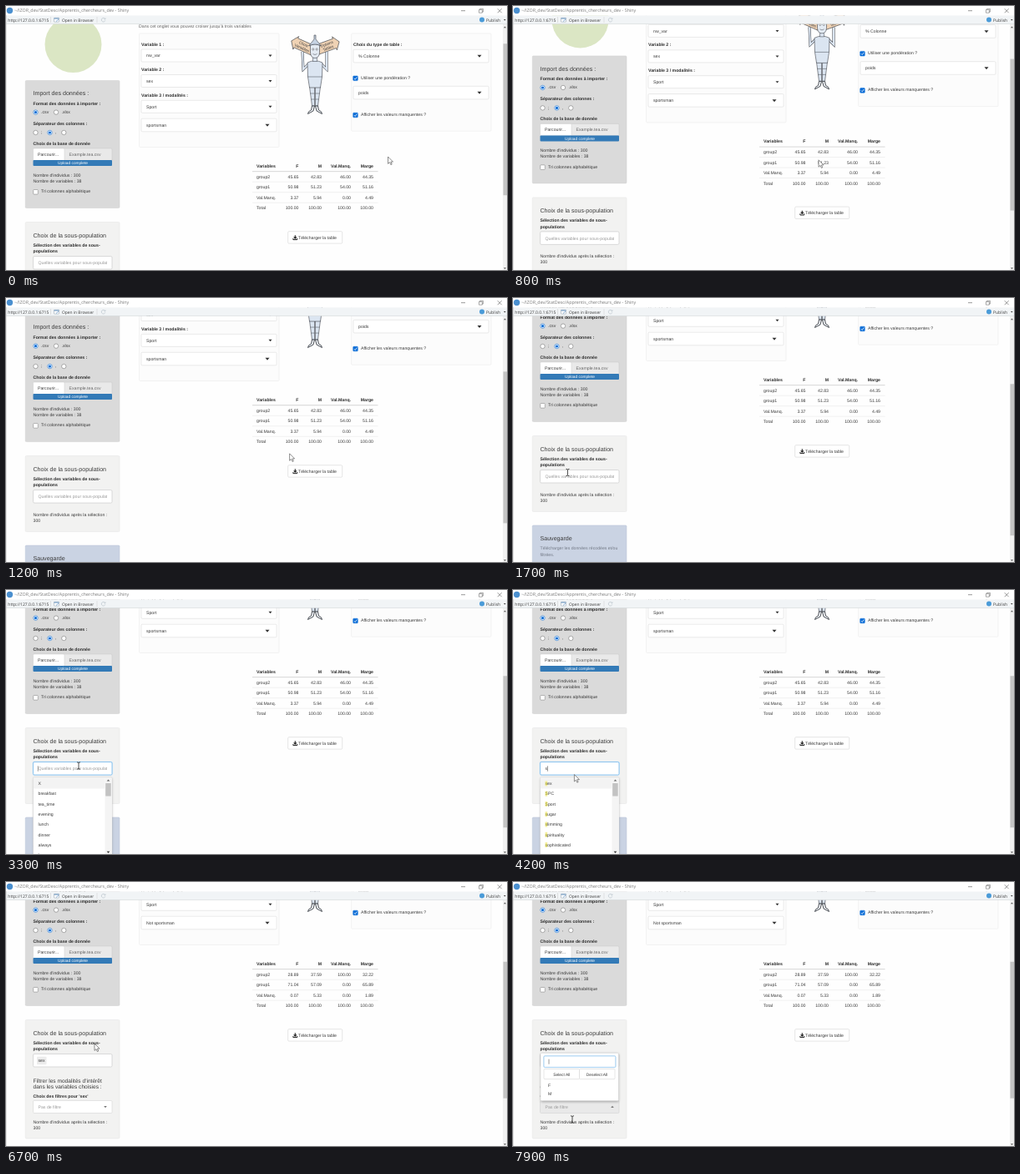
These frames come from a looping animation (600x317 px, 8 s). An HTML page:

```html
<!DOCTYPE html>
<html lang="fr">
<head>
<meta charset="utf-8">
<title>Animation</title>
<style>
html, body { margin: 0; width: 100%; height: 100%; overflow: hidden; background: #fff; }
svg { display: block; width: 600px; height: 317px; }
text { font-family: "Liberation Sans", Arial, sans-serif; font-size: 5.2px; fill: #3a3a3a; white-space: pre; text-rendering: geometricPrecision; }
.b { font-weight: bold; fill: #2c2c2c; }
.h { font-size: 7.1px; }
.h5 { font-size: 6.6px; }
.dim { fill: #999; }
.ui { font-family: "Open Sans", sans-serif; font-size: 5.35px; }
.end { text-anchor: end; }
.mid { text-anchor: middle; }
</style>
</head>
<body>
<svg id="stage" viewBox="0 0 600 317" xmlns="http://www.w3.org/2000/svg"></svg>
<script>
const LOOP = 8000, OPEN = 2200, TYPE = 3900, PICK = 4700, UPDATE = 4900, CLOSE = 6100, FILTER = 7450;
const BLUE = '#337ab7';

// y is the vertical middle of lowercase letters
const text = (x, y, s, cls = '', extra = '') =>
  `<text x="${x}" y="${y + 1.8}" class="${cls}" ${extra}>${s}</text>`;
const rect = (x, y, w, h, fill, stroke = 'none', r = 0, extra = '') =>
  `<rect x="${x}" y="${y}" width="${w}" height="${h}" rx="${r}" fill="${fill}" stroke="${stroke}" stroke-width=".5" ${extra}/>`;
const path = (d, fill = 'none', stroke = '#333', w = .6, extra = '') =>
  `<path d="${d}" fill="${fill}" stroke="${stroke}" stroke-width="${w}" ${extra}/>`;
const caretDown = (x, y, s = 2, c = '#333') => path(`M${x - s} ${y - s / 2}h${2 * s}l${-s} ${s * 1.2}z`, c, 'none');
const caretUp = (x, y, s = 2, c = '#333') => path(`M${x - s} ${y + s / 2}h${2 * s}l${-s} ${-s * 1.2}z`, c, 'none');
const group = (id, body, extra = '') => `<g id="${id}" ${extra}>${body}</g>`;

const select = (x, y, w, h, label, ax = x + w - 7.5, s = 2) =>
  rect(x, y, w, h, '#fff', '#d5d5d5', 1.2) + text(x + 6, y + h / 2, label) + caretDown(ax, y + h / 2, s);
const radio = (x, y, on) =>
  `<circle cx="${x}" cy="${y}" r="2.7" fill="#fff" stroke="${on ? '#0a6cd6' : '#777'}" stroke-width=".6"/>` +
  (on ? `<circle cx="${x}" cy="${y}" r="1.6" fill="#0a6cd6"/>` : '');
const check = (x, y, on) =>
  rect(x, y, 5.6, 5.6, on ? '#0a6cd6' : '#fff', on ? '#0a6cd6' : '#777', .8) +
  (on ? path(`M${x + 1.2} ${y + 2.9}l1.3 1.3 2.1-2.8`, 'none', '#fff', .8) : '');

function robot() {
  const metal = '#dbe5f1', ink = '#3d4148';
  const limb = (d, w) => path(d, 'none', ink, w + 1) + path(d, 'none', metal, w);
  const sign = (cx, a, dir, l1, l2) =>
    `<g transform="translate(${cx} 48) rotate(${a})">` +
    path(`M${-13 * dir} -6H${9 * dir}V-8.5L${15 * dir} 0L${9 * dir} 8.5V6H${-13 * dir}z`, '#efd2b4', ink) +
    text(0, -2.6, l1, 'mid', 'style="font-size:4.6px"') + text(0, 2.4, l2, 'mid', 'style="font-size:4.6px"') + '</g>';
  return limb('M362 70L356 76 355 55', 2) + limb('M378 70L384 76 384 55', 2) +
    sign(355.5, 24, -1, 'Choix', 'Variables') + sign(385, -20, 1, 'Options', 'Tables') +
    path('M363.5 97H369.5L369.5 120H366.5z M370.5 97H376.5L373.5 120H370.500z', metal, ink) +
    path('M364.5 105h5M365.5 112h4M370.5 105h5M370.5 112h4', 'none', ink, .5) +
    path('M366.5 120h3L368 126 361.500 129.500Q361.500 126.500 365.5 125zM370.5 120h3L374.500 125Q378.500 126.500 378.500 129.500L372 126z', '#eef1f5', ink, .9) +
    path('M361 68Q370 63.500 379 68L378.500 85 376.500 98H363.5L361.5 85z', metal, ink) +
    path('M361.5 85h17', 'none', ink, .5) +
    path('M367.5 60h5v6.500h-5z', metal, ink, .5) +
    path('M364.5 47Q370 44.500 375.5 47V56Q375 62.500 370 62.500T364.5 56z', '#e4ebf3', ink) +
    path('M362.5 48Q370 44 377.5 48L371 40V35H369V40z', '#c6d3e3', ink) +
    `<circle cx="367.8" cy="52" r="1.1" fill="#fff" stroke="${ink}" stroke-width=".5"/>` +
    `<circle cx="372.2" cy="52" r="1.1" fill="#fff" stroke="${ink}" stroke-width=".5"/>` +
    path('M367.5 57.5Q370 59.5 372.5 57.5', 'none', ink, .5);
}

const TABLES = [
  ['45.65 42.83 46.00 44.35', '50.98 51.23 54.00 51.16', '3.37 5.94 0.00 4.49', '100.00 100.00 100.00 100.00'],
  ['28.89 37.59 100.00 32.22', '71.04 57.09 0.00 65.89', '0.07 5.33 0.00 1.89', '100.00 100.00 100.00 100.00']
];
const COLS = [350.5, 378, 413, 440];
const figures = rows => rows.map((r, i) =>
  r.split(' ').map((v, j) => text(COLS[j], 205 + 12.5 * i, v, 'end')).join('')).join('');

function mainArea() {
  let s = text(159, 24.5, "Dans cet onglet vous pouvez croiser jusqu'à trois variables", '', 'fill-opacity=".8"');
  s += rect(159.5, 33, 167.5, 136.5, '#fcfcfc', '#e6e6e6', 1);
  s += rect(413.7, 33, 167.3, 117.2, '#fcfcfc', '#e6e6e6', 1);
  s += text(162, 46, 'Variable 1 :', 'b') + select(162, 52, 162, 15, 'nw_var');
  s += text(162, 76.3, 'Variable 2 :', 'b') + select(162, 82.5, 162, 15, 'sex');
  s += text(162, 107.3, 'Variable 3 / modalités :', 'b') + select(162, 113.3, 162, 15, 'Sport');
  s += select(162, 135.2, 162, 15.6, '', 313, 2.5);
  s += group('mod0', text(168, 143, 'sportsman')) + group('mod1', text(168, 143, 'Not sportsman'));
  s += text(416, 46, 'Choix du type de table :', 'b') + select(416, 52.3, 162, 15.6, '% Colonne', 567, 2.5);
  s += check(415.7, 84, true) + text(425, 85.8, 'Utiliser une pondération ?');
  s += select(416, 96.3, 162, 15.6, 'poids', 567, 2.5);
  s += check(415.7, 128.2, true) + text(425, 129.7, 'Afficher les valeurs manquentes ?');
  s += robot();
  s += text(300, 192, 'Variables', 'b');
  ['F', 'M', 'Val.Manq.', 'Marge'].forEach((c, j) => s += text(COLS[j], 192, c, 'b end'));
  s += path('M295 198.7H445.5', 'none', '#ccc', .8);
  ['group2', 'group1', 'Val.Manq.', 'Total'].forEach((n, i) => {
    s += text(300, 205 + 12.5 * i, n);
    if (i) s += path(`M295 ${198.7 + 12.5 * i}H445.5`, 'none', '#e0e0e0', .5);
  });
  s += group('tab0', figures(TABLES[0])) + group('tab1', figures(TABLES[1]));
  s += rect(337.7, 270.7, 65, 14.4, '#fff', '#ccc', 1.2) + text(350, 278, 'Télécharger la table');
  s += path('M346.3 275.3v3.5M344.7 277.3l1.6 1.8 1.6-1.8', 'none', '#222', 1.1) +
    path('M343.9 279v1.6h4.8v-1.6', 'none', '#222', 1);
  return s;
}

const count = y => text(32.5, y, "Nombre d'individus après la sélection :") + text(32.5, y + 7, '300');

function sidebar() {
  let s = '<circle cx="80.5" cy="46" r="34" fill="#dbe6c4"/>';
  s += rect(23.2, 89.5, 112.8, 153, '#dadada', '#cfcfcf', 1.2);
  s += text(32.5, 105.5, 'Import des données :', 'h') + text(32.5, 117, 'Format des données à importer :', 'b');
  s += radio(35.5, 127.6, true) + text(42, 127, '.csv') + radio(60, 127.6) + text(66.5, 127, '.xlsx');
  s += text(32.5, 141, 'Séparateur des colonnes :', 'b');
  s += radio(35.5, 152, false) + text(42, 151.5, ';') + radio(52.5, 152, true) + text(59, 151.5, ',') + radio(69.3, 152, false);
  s += text(32.5, 165, 'Choix de la base de donnée', 'b');
  s += rect(32.5, 171, 94.5, 14.5, '#e9e9e9', '#c4c4c4', 1.2) + rect(32.5, 171, 37.5, 14.5, '#fff', '#ccc', 1.2);
  s += text(38, 178, 'Parcourir...') + text(75.5, 178, 'Example.tea.csv', '', 'style="fill:#666"');
  s += rect(32.5, 185, 94.5, 7, BLUE, 'none', 1) + text(80, 188.5, 'Upload complete', 'mid', 'style="fill:#fff;font-size:4.8px"');
  s += text(32.5, 202.7, "Nombre d'individus : 300") + text(32.5, 210, 'Nombre de variables : 38');
  s += check(32.7, 220.5, false) + text(42, 222.5, 'Tri colonnes alphabétique');
  s += `<rect id="panel" x="23.2" y="259.5" width="112.8" rx="1.2" fill="#f2f2f1" stroke="#e2e2e2" stroke-width=".5"/>`;
  s += text(32.5, 276.3, 'Choix de la sous-population', 'h');
  s += text(32.5, 287.3, 'Sélection des variables de sous-', 'b') + text(32.5, 294.5, 'populations', 'b');
  s += `<rect id="glow" x="31.7" y="299.7" width="96.1" height="17.1" rx="2" fill="#cfe6f7"/>`;
  s += `<rect id="field" x="32.5" y="300.5" width="94.5" height="15.5" rx="1.5" fill="#fff" stroke-width=".7"/>`;
  s += group('hint', text(38.5, 308.5, 'Quelles variables pour sous-populations', 'dim'), 'clip-path="url(#inField)"');
  s += group('typed', text(38.5, 308.5, 's'));
  s += group('pill', rect(37, 303.8, 11.5, 9.4, '#ececec', 'none', .8) + text(38.5, 308.5, 'sex'));
  s += path('M0 305.3v6.4', 'none', '#333', .5, 'id="caret"');
  s += group('before', count(330));
  s += group('after',
    text(32.5, 333.3, "Filtrer les modalités d'intérêt", 'h5') + text(32.5, 340.5, 'dans les variables choisies :', 'h5') +
    text(32.5, 351, "Choix des filtres pour 'sex'", 'b') +
    '<rect id="filterBox" x="32.5" y="356.5" width="94.5" height="15" rx="1.2" stroke="#ccc" stroke-width=".5"/>' +
    text(38.5, 364, 'Pas de filtre', 'dim') +
    group('arrowDn', caretDown(119, 364, 1.8, '#777')) + group('arrowUp', caretUp(119, 364, 1.8, '#777')) +
    count(382));
  s += group('save', rect(23.2, 367, 112.8, 62, '#cad3e3', '#b9c3d6', 1.2) + text(32.5, 383, 'Sauvegarde', 'h') +
    text(32.5, 394.5, 'Télécharger les données récodées et/ou', '', 'style="fill:#737a87"') +
    text(32.5, 402, 'filtrées.', '', 'style="fill:#737a87"'));
  return s;
}

const hit = c => `<tspan style="fill:#8a8a20">${c}</tspan>`;
function items(names, marked) {
  return names.map((n, i) => {
    const y = 326.4 + 12.27 * i, k = n.search(/s/i);
    let mark = '', label = n;
    if (marked && k >= 0) {
      const lead = [...n.slice(0, k)].reduce((w, c) => w + ('ftrl'.includes(c) ? .28 : c === 'w' ? .72 : .54), 0) * 5.2;
      mark = rect(38.5 + lead, y - 3, 2.7, 6, '#f3ee9a');
      label = n.slice(0, k) + hit(n[k]) + n.slice(k + 1);
    }
    return mark + text(38.5, y, label);
  }).join('');
}
function dropdowns() {
  const all = ['X', 'breakfast', 'tea_time', 'evening', 'lunch', 'dinner', 'always', 'home'];
  const found = ['sex', 'SPC', 'Sport', 'sugar', 'slimming', 'spirituality', 'sophisticated'];
  const shade = 'filter="url(#soft)"';
  return group('list', rect(33, 320, 94, 96, '#000', 'none', 1, shade + ' opacity=".25"') +
      rect(32.5, 319, 94.5, 96, '#fff', '#ccc', 1) + rect(32.8, 320, 85.7, 12.5, '#f3f3f3') +
      rect(118.5, 319.5, 8, 95, '#f4f4f4') + rect(119.2, 326, 6.5, 15.5, '#c3c3c3') +
      caretUp(122.5, 322.7, 1.8, '#666') + caretDown(122.5, 408.7, 1.8, '#333') +
      group('plain', items(all)) + group('found', items(found, true)) + group('marked', items(all, true))) +
    group('menu', rect(33.5, 300, 93, 58, '#000', 'none', 1, shade + ' opacity=".3"') +
      rect(33, 299.3, 93.5, 57.5, '#fff', '#ccc', 1.2) +
      rect(36.3, 302.2, 87.2, 15, '#d6eaf8', 'none', 2) + rect(37, 303, 85.8, 13.4, '#fff', '#66afe9', 1.2) +
      rect(37, 318.5, 42.5, 12.2, '#fff', '#ccc', 1) + rect(79.5, 318.5, 42.5, 12.2, '#fff', '#ccc', 1) +
      text(58.3, 324.7, 'Select All', 'mid', 'style="font-size:4.9px"') +
      text(100.5, 324.7, 'Deselect All', 'mid', 'style="font-size:4.9px"') +
      text(42, 338, 'F') + text(42, 348, 'M') +
      path('M43 306.7v6', 'none', '#333', .5, 'id="caret2"'));
}

function chrome() {
  let s = rect(0, 0, 600, 11.5, '#fff') + rect(0, 11.5, 600, 10, '#f1f4f6') + path('M0 21.5H600', 'none', '#d3d8db', .6);
  s += path('M.3 11V317', 'none', '#c9c9c9', .6);
  s += '<circle cx="4.5" cy="5.5" r="3.7" fill="#4a8fcf"/>';
  s += text(10, 5.6, '~/IZOR_dev/StatDesc/Apprentis_chercheurs_dev - Shiny', 'ui', 'style="fill:#777"');
  s += path('M545 5.7h5M588.7 3.2l5 5M593.7 3.2l-5 5', 'none', '#555', .6);
  s += path('M566.5 4.4h3.8v3.8h-3.8zM567.6 4.4v-1.1h3.8v3.8h-1.1', 'none', '#555', .5);
  s += text(2.3, 16.7, 'http://127.0.0.1:6715', 'ui', 'style="font-size:5.05px"');
  s += path('M53.5 13v7M109 13v7', 'none', '#ccc', .5);
  s += rect(57.5, 14.3, 6, 4.8, '#fff', '#8c9aa8', .4) + rect(57.5, 14.3, 6, 1.3, '#7da3c8') + path('M60 18.5l3-2.5', 'none', '#5a8fc4', .7);
  s += text(67, 16.7, 'Open in Browser', 'ui', 'style="font-size:4.9px"');
  s += path('M118.6 15.5a2.3 2.3 0 1 0 .2 1.9M119 14.3v1.6h-1.6', 'none', '#b9c3cc', .7);
  s += '<circle cx="570" cy="16.5" r="3" fill="#4a9bd8"/>';
  s += text(575, 16.7, 'Publish', 'ui', 'style="font-size:5px"') + caretDown(597.3, 16.7, 1.3);
  s += rect(595, 22, 5, 295, '#f1f1f1') + caretUp(597.5, 25.5, 1.5, '#555') + caretDown(597.5, 315, 1.5, '#555');
  s += '<rect id="thumb" x="595.5" width="4.5" fill="#c4c4c4"/>';
  return s;
}

const stage = document.getElementById('stage');
stage.innerHTML = '<defs><clipPath id="inField"><rect x="33" y="300" width="88" height="16"/></clipPath>' +
  '<filter id="soft" x="-20%" y="-20%" width="140%" height="140%"><feGaussianBlur stdDeviation="1.5"/></filter></defs>' +
  rect(0, 0, 600, 317, '#fefefe') + group('page', mainArea() + sidebar() + dropdowns()) + chrome() +
  group('arrow', path('M0 0V8.4L2 6.6L3.4 9.6L4.7 9L3.4 6.1H6z', '#fff', '#444', .6)) +
  group('beam', path('M-2-4.2Q0-4.2 0-3.2Q0-4.2 2-4.2M0-3.2V3.2M-2 4.2Q0 4.2 0 3.2Q0 4.2 2 4.2', 'none', '#222', .8));

const el = {};
stage.querySelectorAll('[id]').forEach(n => el[n.id] = n);
const show = (id, on) => el[id].style.display = on ? '' : 'none';
const attr = (id, o) => { for (const k in o) el[id].setAttribute(k, o[k]); };

// eased value through [time, ...values] keys, held before the first and after the last
function track(keys, t) {
  const n = keys.findIndex(k => k[0] > t);
  if (n === 0) return keys[0].slice(1);
  if (n < 0) return keys[keys.length - 1].slice(1);
  const a = keys[n - 1], b = keys[n];
  const p = (t - a[0]) / (b[0] - a[0]), e = p * p * (3 - 2 * p);
  return a.slice(1).map((v, j) => v + (b[j + 1] - v) * e);
}
const SCROLL = [[500, 0], [1000, 45.5], [1400, 94]];
const MOUSE = [[100, 457.5, 181], [900, 362, 185], [1100, 362, 185], [1700, 65.5, 209.5], [2300, 76, 213], [3300, 87, 211],
  [3900, 87, 212], [4500, 60, 231], [4700, 60, 231], [5200, 63, 218], [5600, 64, 217], [6300, 106, 194],
  [6800, 106, 194], [7300, 88, 272], [7500, 88, 272], [7900, 71, 285]];

const blink = (t, from) => (t - from) % 1060 < 530;

function draw(t) {
  const scroll = track(SCROLL, t)[0], [mx, my] = track(MOUSE, t);
  const picked = t >= PICK, updated = t >= UPDATE, open = t >= OPEN && t < CLOSE, menu = t >= FILTER;
  const typed = t >= TYPE && !picked;
  attr('page', { transform: `translate(0 ${-scroll})` });

  const ratio = 285 / (updated ? 513 : 462);
  attr('thumb', { y: 28 + (scroll + 28) * ratio, height: 295 * ratio });
  for (const id of ['mod', 'tab']) { show(id + 0, !updated); show(id + 1, updated); }
  show('before', !updated); show('after', updated);
  attr('panel', { height: updated ? 142.5 : 91 });
  attr('save', { transform: `translate(0 ${updated ? 51.5 : 0})` });

  show('glow', open);
  attr('field', { stroke: open ? '#66afe9' : '#ccc' });
  show('hint', !typed && !picked); show('typed', typed); show('pill', picked);
  show('caret', open && blink(t, picked ? PICK : typed ? TYPE : OPEN));
  attr('caret', { transform: `translate(${picked ? 49.8 : typed ? 41.5 : 38.3} 0)` });
  show('list', open);
  show('plain', t < TYPE); show('found', typed); show('marked', picked);

  show('menu', menu); show('caret2', blink(t, FILTER));
  attr('filterBox', { fill: menu ? '#e9e9e9' : '#fff' });
  show('arrowDn', !menu); show('arrowUp', menu);

  const beam = t >= 1550 && t < 4200 || t >= 5000 && t < 5900 || t >= 7750;
  show('beam', beam); show('arrow', !beam);
  attr(beam ? 'beam' : 'arrow', { transform: `translate(${mx} ${my})` });
}
function tick() {
  draw(performance.now() % LOOP);
  requestAnimationFrame(tick);
}
tick();
</script>
</body>
</html>
```
